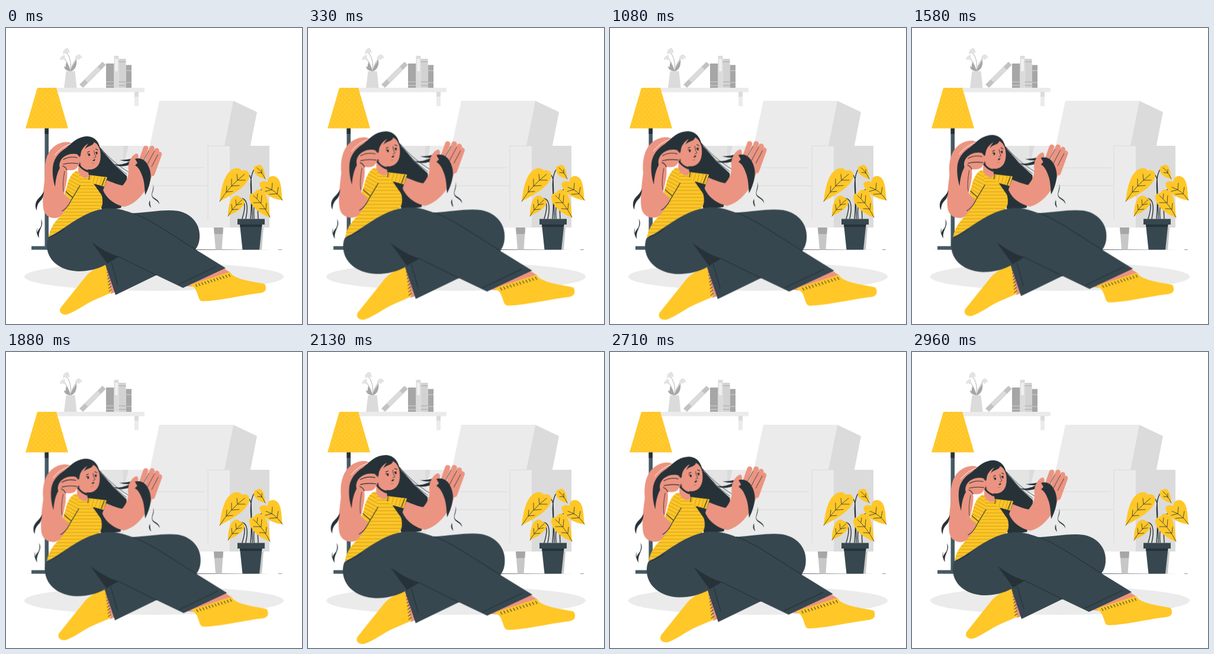
Write an HTML page without scripts that moves like this. It is 500 px wide and 500 px high and loops after 3 s.

```html
<!DOCTYPE html>
<html lang="en">
<head>
<meta charset="utf-8">
<title>Hair loss</title>
<style>
html, body { margin: 0; width: 100%; height: 100%; overflow: hidden; background: #fff; }
svg { display: block; width: 100vw; height: 100vh; }
.line { fill: none; stroke: #263238; stroke-width: 1.1; stroke-linecap: round; stroke-linejoin: round; }
.fine { stroke-width: .8; }
.bold { stroke-width: 1.4; }
.ink { fill: #263238; }
.skin { fill: #eb9481; }
.gold { fill: #ffc727; }
.cloth { fill: #37474f; }
.ticks { stroke: #263238; stroke-width: 5; stroke-dasharray: 1 4.3; }
.woman { transform-origin: 238px 332px; animation: pulse 3s linear infinite; }
@keyframes pulse {
  0%, 98.8%, 100% { transform: scale(1); }
  19.4% { transform: scale(1.1); }
  59% { transform: scale(1); }
  78.8% { transform: scale(1.099); }
}
</style>
</head>
<body>
<svg viewBox="0 0 500 500">
<defs>
  <pattern id="dots" width="8" height="8" patternUnits="userSpaceOnUse">
    <circle cx="2" cy="2" r=".65" fill="#ffe08a"/><circle cx="6" cy="6" r=".65" fill="#ffe08a"/>
  </pattern>
  <pattern id="stripes" width="20" height="5.6" patternUnits="userSpaceOnUse">
    <path d="M0 3H20" stroke="#cf9f20" stroke-width="1.1"/>
  </pattern>
  <pattern id="slant" width="6" height="20" patternUnits="userSpaceOnUse" patternTransform="rotate(16)">
    <path d="M3 0V20" stroke="#cf9f20" stroke-width="1.1"/>
  </pattern>
  <pattern id="cuff" width="20" height="5.6" patternUnits="userSpaceOnUse" patternTransform="rotate(28)">
    <path d="M0 3H20" stroke="#cf9f20" stroke-width="1.1"/>
  </pattern>
  <path id="shade" d="M53 101H85L105 169.5H33Z"/>
  <path id="torso" d="M118 242L123 243C128 252 136 255 141 249L147 251L150 264C160 274 164 285 163 296C162 304 158 309 150 312L72 353C74 341 80 329 92 318C100 310 107 297 110 288L104 262Z"/>
  <path id="sleeveL" d="M121 241C112 243 108 252 105 260L99 281L109 291L125 266Z"/>
  <path id="sleeveR" d="M138 248L171 252L166 268L144 262Z"/>
</defs>

<ellipse cx="250" cy="420" rx="219" ry="24" fill="#ebebeb"/>
<path class="ink" d="M31 374.300L240 373.800L449 374.300L240 374.900ZM460 374H466V374.600H460Z"/>

<!-- shelf -->
<rect x="78" y="101" width="156" height="7.5" rx="2" fill="#ebebeb"/>
<path d="M217 108h7v24h-7z" fill="#ebebeb"/>
<path d="M217 108h7v8h-7z" fill="#dbdbdb"/>
<path d="M169 60h13.5v41H169zM202.5 62.5H212V101H202.5z" fill="#a6a6a6"/>
<path d="M182.5 47H190.5V101H182.5z" fill="#dbdbdb"/>
<path d="M184 52h5v21h-5z" fill="#f0f0f0"/>
<path d="M190.5 52H202.5V101H190.5z" fill="#d2d2d2"/>
<path d="M190.5 57h12M190.5 91h12M190.5 97h12M202.5 72h9.5M202.5 92h9.5M169 91h13.5M169 97h13.5" stroke="#bdbdbd" stroke-width="2"/>
<path d="M124 95.5L163 57L168.5 62.5L130 101Z" fill="#c2c2c2"/>
<path d="M133 87L155 65.5L160 70.5L138 92Z" fill="#dbdbdb"/>
<path d="M109 74C111 60 108 49 102 41M109 74C106 62 102 56 97 49M110 74C111 62 116 54 122 48" fill="none" stroke="#b0b0b0" stroke-width="1"/>
<path d="M109 73C100 70 99 63 103 57C104 64 108 66 109 73ZM110 73C110 65 114 62 119 53C120 62 118 70 110 73ZM108 73C102 72 99 70 98 65C104 66 106 69 108 73Z" fill="#a6a6a6"/>
<g fill="#e3e3e3" stroke="#d2d2d2" stroke-width=".5">
  <path d="M104 34C98 35 96 40 97 44L100 42L102 44L104 41L107 42Q107 37 104 34ZM99 46C94 47 91 50 92 54L95 52L97 54L99 51Z"/>
  <path d="M122 45C117 48 116 51 119 54L121 51L123 54L125 50L128 51Q127 45 122 45Z"/>
</g>
<path d="M101.5 73H116.5L119.5 101H98Z" fill="#dbdbdb"/>

<!-- armchair -->
<path d="M160 199h38v138h-38z" fill="#e4e4e4"/>
<path d="M198 199H212V337H198z" fill="#dbdbdb"/>
<path d="M207 199H341V337H198V234Z" fill="#ebebeb"/>
<path d="M259 123H384L369 199L341 203H242Z" fill="#ebebeb"/>
<path d="M384 123L424 142L412 203H368Z" fill="#dbdbdb"/>
<path d="M378 199H445V337H378Z" fill="#dbdbdb"/>
<path d="M341 199H378V337H341Z" fill="#ebebeb"/>
<path d="M198 236H336M198 266.5H341M341 199V323M341 199H378" fill="none" stroke="#d8d8d8" stroke-width=".9"/>
<path d="M351 337H367L364.5 374.5H354ZM428 337H435L432 374.5H427Z" fill="#c7c7c7"/>
<path d="M351 337H367L366.2 348H352Z" fill="#a6a6a6"/>

<!-- plant -->
<path class="line bold" d="M399 322C404 306 406 292 395 287M405 322C409 304 408 290 399 288M413 322C415 302 415 276 414 256C412 245 404 243 395 247M416 322C417 290 409 262 417 243Q419 236 428 237M419 322C417 300 422 280 430 282M426 322C425 304 425 283 427 277Q433 269 443 271"/>
<g class="gold">
  <path d="M361 293C363 276 367 248 382 239C390 235 396 237 398 241C407 238 414 245 410 254C404 270 384 280 361 293Z"/>
  <path d="M419 236C421 231 424 234 427 231C433 230 437 240 438 255C427 253 416 245 419 236Z"/>
  <path d="M428 263C432 257 438 259 442 260C441 250 453 246 460 255C466 264 465 278 467 291C451 289 431 280 428 263Z"/>
  <path d="M375 318C375 303 378 285 389 283C395 283 394 287 399 288C406 291 403 299 397 304C389 312 382 313 375 318Z"/>
  <path d="M411 286C411 278 418 280 420 278C423 270 435 271 440 284C444 294 445 309 446 320C431 315 412 302 411 286Z"/>
</g>
<path class="line fine" d="M361 293Q377 267 403 247M372 277l1-10M372 277l11 -1M381 267l0-12M381 267l13-1M391 257l-1-10M391 257l13 0M438 255Q432 242 424 236M432 245l0-6M432 245l-7-1M467 291Q455 273 439 269M458 280l2-11M458 280l-13 1M449 273l1-11M449 273l-11 3M375 318Q383 303 399 290M382 307l-1-9M382 307l10-1M389 299l-1-9M389 299l9-2M446 320Q435 298 418 283M439 306l1-10M439 306l-11-1M431 295l1-12M431 295l-13 0M424 288l1-8"/>
<path class="cloth" d="M391 322.5H437V332H432.5L428 374.5H399.5L395 332H391Z"/>
<path class="ink" d="M395 332H432.5L432 336H395.5Z"/>

<!-- lamp -->
<path d="M65.5 168H72V370H65.5Z" fill="#455a64"/>
<path class="ink" d="M65.5 168H72V179H65.5Z"/>
<path d="M43 368.5H95V374.5H43Z" fill="#455a64"/>
<use href="#shade" class="gold"/><use href="#shade" fill="url(#dots)"/>

<g class="woman">
  <!-- back hair -->
  <path class="ink" d="M150 188L162 207L182 230L204 250L205 270L194 304L163 309L146 262L122 232L126 200Z"/>
  <path class="line fine" d="M156 199C172 217 188 232 208 244M160 203C172 219 186 235 204 247"/>

  <!-- raised arm -->
  <path class="skin" d="M113 197C107 189 90 192 79 202C68 212 64 230 66 250C63 273 60 300 65 311C70 322 86 324 94 317C102 309 107 298 109 290L98 280C101 266 105 252 103 240L124 216Z"/>

  <!-- shirt -->
  <use href="#torso" class="gold"/><use href="#torso" fill="url(#stripes)"/>
  <use href="#sleeveR" class="gold"/><use href="#sleeveR" fill="url(#slant)"/>
  <use href="#sleeveL" class="gold"/><use href="#sleeveL" fill="url(#cuff)"/>
  <path class="skin" d="M122 228L138 238L140 250C136 257 126 252 122 243Z"/>
  <path class="line" d="M125 266L110 291Q104 304 95 309M101 276L112 286M167 253L162 266M141 249L140 256"/>
  <path class="ink" d="M148 263L165 268L162 283Z"/>

  <!-- head -->
  <path class="ink" d="M122 222C124 234 133 241 142 240L138 244C128 240 122 233 120 228Z"/>
  <path class="skin" d="M123 212C122 232 132 240 144 239C156 237 162 226 159 207C156 195 148 190 138 192C128 196 123 204 123 212Z"/>
  <path class="ink" d="M104 203C112 191 124 183 138 183C151 184 158 193 160 208C157 199 154 195 149 192C148 200 138 198 133 205C135 200 137 198 139 195C131 200 126 207 126 215L123 222L118 206Z"/>
  <ellipse class="ink" cx="140.500" cy="214.300" rx="1.500" ry="2.300"/>
  <ellipse class="ink" cx="153.200" cy="211.500" rx="1.400" ry="2.200"/>
  <path class="line" d="M137.500 210L141 208.500M151.500 204.500L155 206M137.500 213L140 212.500M151 210.500L154 209.500"/>
  <path class="line fine" d="M148.500 207Q149 214 152 217.500L148.500 219.500"/>
  <path class="ink" d="M146 224Q149 221 151 222Q150 224 148.500 225Z"/>
  <path d="M145 229.500Q147 228 149 229" fill="none" stroke="#b96a5a" stroke-width=".8"/>

  <!-- lock and fist -->
  <path class="ink" d="M128 186C116 188 107 198 101 203C88 211 80 222 79 236C78 250 81 262 83 268C84 252 88 238 96 230C101 219 115 212 126 212Z"/>
  <path d="M82 215Q93 201 109 196" fill="none" stroke="#fff" stroke-width=".9"/>
  <path class="skin" d="M122 214C112 210 101 214 95 220C89 227 89 235 93 241L104 240C111 241 119 240 121 234L124 229C126 222 126 217 122 214Z"/>
  <path class="line" d="M120 219Q108 216 97 222M122 229Q108 227 97 230M103 240Q101 235 96 233M119 211L124 217"/>
  <path class="line fine" d="M99 242Q95 262 97 276"/>

  <!-- open hand -->
  <path class="ink" d="M182 230C196 233 204 227 218 222V230C207 230 196 238 182 230ZM192 223Q205 223 218 219V224Q204 227 192 223Z"/>
  <path class="skin" d="M170 257C180 261 190 265 197 266C204 258 207 250 207 240C205 228 212 215 220 212C225 212 224 219 222 226L229 222L255 234L246 251C240 272 222 297 200 302C185 299 170 289 164 274Z"/>
  <path d="M236 203L228 226M246.500 203L236 232M254.500 207L242 240M259 213L247 246" fill="none" stroke="#eb9481" stroke-width="8.500" stroke-linecap="round"/>
  <path class="line fine" d="M241 207L232 225M250.500 208L239 230M256.500 214L246 234"/>
  <path class="ink" d="M218 221C224 219 231 221 235 225C242 232 246 246 244 255C243 264 239 275 235 282C234 270 234 258 229 247C226 239 222 234 218 232L222 228Z"/>

  <!-- falling hairs -->
  <g class="ink">
    <path d="M64 275C60 286 52 287 50 297Q49 304 52 308C52 299 55 295 60 290Q64 284 64 275Z"/>
    <path d="M59 323C66 334 53 341 56 355C50 347 53 343 58 337Q61 331 59 323ZM53 337Q51 347 55 351Q49 346 53 337Z"/>
    <path d="M248.500 264C252 276 243 280 249 286C255 290 259 292 259 298C257 292 252 291 248 287C243 280 250 275 248.500 264Z"/>
    <path d="M243 291Q239 298 245 304Q243 298 243 291Z"/>
  </g>

  <!-- socks and ankles -->
  <path class="skin" d="M166 400L172 398L185 446L177 449Z"/>
  <path class="gold" d="M168 400C153 404 140 412 132 423L92 473C89 480 94 485 103 484C120 478 134 466 148 460L178 447Z"/>
  <path class="ticks" transform="translate(172 406) rotate(84) skewX(32)" d="M0 0H42"/>
  <path class="skin" d="M365 404L379 413L319 437L304 436Z"/>
  <path class="gold" d="M310 434L378 412L382 417C396 427 424 429 437 432.500C441 440 439 446 431 447.500C400 451 360 461 333 461.500C327 462 326 457 324 451C322 445 320 440 317 438Z"/>
  <path class="ticks" transform="translate(321 435) rotate(-17) skewX(15)" d="M0 0H62"/>

  <!-- trousers -->
  <path class="cloth" d="M72 353C102 339 130 308 172 304.500C190 304 203 309 214 313C245 311 268 306 290 309C316 314 328 334 327 352C327 363 323 370 320 374L371 405.500L299 439L254 417.500L185 451L168 400C155 407 140 411 122 411C91 410 69 392 69 367Q69 358 72 353Z"/>
  <path class="ink" d="M145 362C161 373 175 382 191 386L171 398Z"/>
  <path class="line" d="M214 313C240 321 275 346 320 374M190 386L254 417.500M292 433L355 403M178 396L189 434M74 353Q90 346 98 340"/>
</g>
</svg>
</body>
</html>
```
